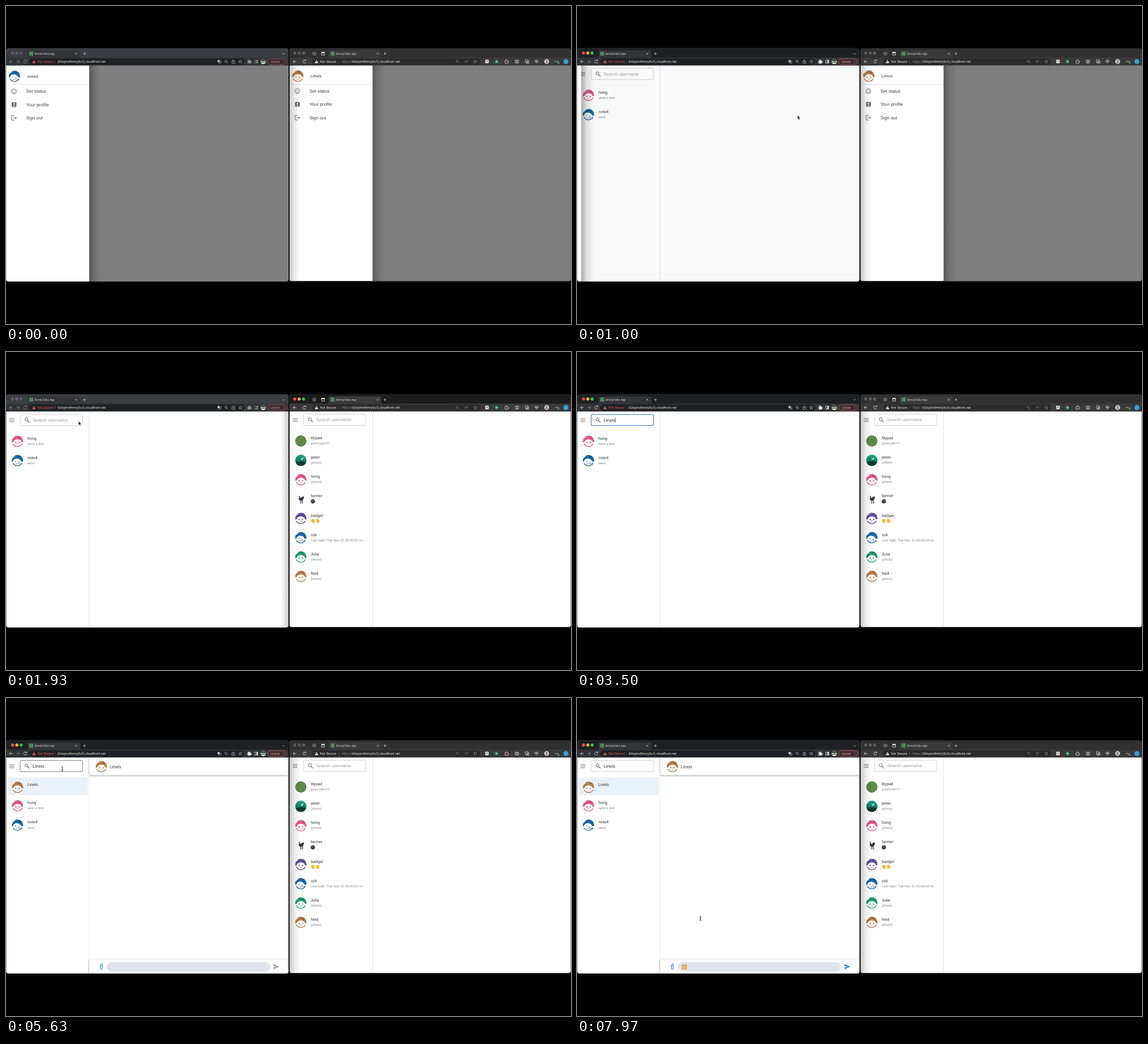
An HTML page for the animation above (8 s loop, 998 by 561 pixels).

```html
<!DOCTYPE html>
<html lang="en">
<head>
<meta charset="utf-8">
<title>Two chat windows</title>
<style>
html, body { margin: 0; width: 100%; height: 100%; overflow: hidden; background: #000; }
svg { display: block; width: 998px; height: 561px; font-family: "Liberation Sans", Arial, sans-serif; text-rendering: geometricPrecision; }
.light { fill: #5b5d61; }
.on .light0 { fill: #ef4d62; }
.on .light1 { fill: #f4b52e; }
.on .light2 { fill: #30c748; }
#left .strip { fill: #3a3d42; }
#left.on .strip { fill: #1f2023; }
#right .strip { fill: #303030; }
#right.on .strip { fill: #1c1c1c; }
.dim { opacity: .5; }
.on .dim { opacity: 1; }
.update { opacity: .75; }
.on .update { opacity: 1; }
</style>
</head>
<body>
<svg id="stage" viewBox="0 0 998 561"></svg>
<script>
const LOOP = 8000;
const PERSON = "Lewis";
const BLUE = "#1767ab", PINK = "#e5588c", BROWN = "#b77a45", PURPLE = "#6650a4", TEAL = "#219b72";
const URL_TEXT = "d1kqmv9mmy5u7j.cloudfront.net";

// Drawing helpers, each returning SVG markup
const text = (x, y, s, size, fill, more = "") => `<text x="${x}" y="${y}" font-size="${size}" fill="${fill}" ${more}>${s}</text>`;
const rect = (x, y, w, h, fill, more = "") => `<rect x="${x}" y="${y}" width="${w}" height="${h}" fill="${fill}" ${more}/>`;
const circle = (x, y, r, fill, more = "") => `<circle cx="${x}" cy="${y}" r="${r}" fill="${fill}" ${more}/>`;
const line = (d, stroke, w = .9, fill = "none") => `<path d="${d}" stroke="${stroke}" stroke-width="${w}" fill="${fill}"/>`;
const shape = (d, fill) => `<path d="${d}" fill="${fill}"/>`;
const at = (x, y, body, more = "") => `<g transform="translate(${x} ${y})" ${more}>${body}</g>`;
const group = (id, body, more = "") => `<g id="${id}" ${more}>${body}</g>`;

function avatar(x, y, c, wink) {
  const eyes = wink
    ? line("M-4.5 1.6l2.6 .3M1 2.6l2.4 .6M-2.6 5q2 1.4 3.6 .6", c, .8) + shape("M2 4l5 2.4-2.6 .8-.6 2.2z", "#fff") + line("M2 4l4.6 2.4-2.4 .6-.8 2z", "#444", .5)
    : circle(-3, 2, 1.2, c) + circle(3, 2, 1.2, c) + line("M-1.6 4.8q1.6 1.6 3.2 0", c, .8);
  return at(x, y, circle(0, 0, 10, c) +
    `<ellipse cx="0" cy="2.6" rx="7.4" ry="6" fill="#fff" ${wink ? 'transform="rotate(14)"' : ""}/>` +
    circle(-8, 3, 1.6, "#fff") + circle(8, 3, 1.6, "#fff") +
    shape("M-10 -6l4 -4 1.6 2.2-4.4 3.4z", "#fff") +
    line("M1 -9q.4 3 4 3.6M3.6 -8.6q0 2 2.6 3", "#0005", .8) + eyes);
}

const wave = (x, y) => at(x, y, line("M-3 -1l3 3M-2 -3l3 3.4M0 -3.6l2 3.4M3 -2.6l-.4 3", "#f2b632", 1.4) + circle(1, 1.2, 2.7, "#f4bd3c"));

const bird = (x, y) => at(x, y, line("M-4 -5q3 0 1.4 4M0 3v5M3 3v5", "#37323f", 1.3) +
  shape("M-4 -1q4 -1 9 -4 1 6-3 8-5 1-6-4z", "#37323f") + line("M-2 8h6", "#ddd", 1));

const hills = (x, y) => circle(x, y, 10, "url(#hills)") + shape(`M${x - 9} ${y + 3}q9 -3 18 0q-2 7-9 7t-9-7z`, "#0d3b31") +
  shape(`M${x - 1} ${y - 2}l6 -3-2 4z`, "#dff3e8");

function row(i, pic, name, sub) {
  const y = i * 34.1;
  return at(0, y, pic(20.3, 157.4) + text(37.8, 154.6, name, 7.15, "#333") + (sub && sub[0] === "<" ? sub : text(37.8, 163.7, sub, 5.93, "#858585")));
}
const face = (c, wink) => (x, y) => avatar(x, y, c, wink);

const hamburger = line("M6 117.6h8.6M6 120.3h8.6M6 123h8.6", "#6f6f6f", .9);
const magnifier = circle(36.2, 119, 2.7, "none", 'stroke="#666" stroke-width="1"') + line("M38.2 121l3.2 3.2", "#666", 1.2);

function drawer(id, name, pic) {
  const items = ["Set status", "Your profile", "Sign out"];
  const grey = "#666";
  const icons = circle(14, 150.6, 4.3, "none", `stroke="${grey}"`) + circle(12.5, 149.4, .7, grey) + circle(15.5, 149.4, .7, grey) +
    line("M11.8 151.8q2.2 2.6 4.4 0", grey, .8) +
    rect(10, 170, 8.4, 8.2, grey, 'rx="1"') + circle(14.2, 172.9, 1.4, "#fff") + shape("M11.3 177q2.9 -3 5.8 0z", "#fff") +
    line("M14.5 193.4h-4.4v8h4.4M12.6 197.4h5.6M16.2 195.3l2.2 2.1-2.2 2.1", grey, 1);
  return rect(0, 104, 499, 384, "#000", `id="${id}Dim"`) + group(id,
    rect(147, 104, 22, 384, "url(#shade)") + rect(-1, 104, 148, 384, "#fff") + pic(15, 124) +
    text(37.2, 126.5, name, 7.8, "#444") + rect(0, 138.4, 147, .7, "#ddd") + icons +
    items.map((s, i) => text(35.5, 153.3 + 23.5 * i, s, 8, "#444")).join(""));
}

const lights = (x, step) => [0, 1, 2].map(i => circle(x + step * i, 83, 2.7, "", `class="light light${i}"`)).join("").replace(/fill=""/g, "");
const cross = x => line(`M${x - 1.6} 82.6l3.2 3.2m0 -3.2l-3.2 3.2`, "#ccc", .7);
const plus = x => line(`M${x - 2.4} 84.2h4.8m-2.4 -2.4v4.8`, "#ccc", .8);
const back = (x, s = 1) => line(`M${x + 2.8 * s} 98h${-5.6 * s}m${2.4 * s} -2.4l${-2.4 * s} 2.4 ${2.4 * s} 2.4`, "#ddd", .9);
const reload = x => line(`M${x + 2} 96.2a2.7 2.7 0 1 0 .6 2.4M${x + 2.6} 94.6v2h-2`, "#ddd", .8);
const warn = (x, c) => shape(`M${x} 95l3.2 5.8h-6.4z`, c) + rect(x - .4, 97, .8, 2, "#222");
const star = (x, c) => line(`M${x} 95l.9 2 2.2 .2-1.7 1.4 .5 2.1-1.9 -1.1-1.9 1.1 .5 -2.1-1.7 -1.4 2.2 -.2z`, c, .6);
const lens = (x, c) => circle(x - .5, 97.4, 1.8, "none", `stroke="${c}" stroke-width=".7"`) + line(`M${x + .8} 98.8l1.8 1.8`, c, .8);
const puzzle = (x, c, fill) => line(`M${x - 2.4} 96.4h1.6a1 1 0 1 1 1.8 0h1.6v1.4a1 1 0 1 1 0 1.8v1.4h-5z`, c, .7, fill);
const tab = (x, w, c) => shape(`M${x - 3} 91.5q3 0 3 -3v-7.5q0 -3 3 -3h${w - 6}q3 0 3 3v7.5q0 3 3 3z`, c);
const title = x => text(x, 86.1, "BrimlyTalks App", 5.05, "#ddd");

function leftChrome() {
  const g = "#c8cacd", red = "#e2605c";
  return `<rect class="strip" x=".5" y="75" width="498" height="17"/>` + lights(11.5, 7.6) +
    tab(38, 93, "#333438") + rect(.5, 91, 498, 14, "#333438") +
    rect(41, 80.6, 7, 7, "#4f8a5b") + title(50.5) + cross(124) + plus(138.6) + line("M488.2 83.4l2 2 2 -2", "#ccc", .8) +
    `<g class="dim">${back(9)}</g><g opacity=".45">${back(21, -1)}</g><g class="dim">${reload(34)}</g>` +
    rect(41, 92.6, 380, 10.8, "#1f2023", 'rx="5.4"') + warn(49.5, red) + text(55.5, 100.1, "Not Secure", 5.8, red) +
    rect(87.3, 95.6, .6, 5, "#666") + text(91, 100.1, URL_TEXT, 5.88, "#eee") +
    rect(373.8, 95.2, 3.6, 4, g, 'rx=".6"') + line("M376.6 97h3v4h-3z", g, .6) + lens(389, g) +
    line("M400.4 97h-1.4v4h5v-4h-1.4M401.5 99v-4m-1.2 1.2l1.2 -1.2 1.2 1.2", g, .7) + star(414, g) +
    `<g class="dim">${puzzle(429.5, "#eee", "#eee")}${line("M439.6 95.6h5v5h-5z", "#eee", .8)}${rect(442.4, 95.6, 2.2, 5, "#eee")}</g>` +
    circle(454.4, 98, 4.5, "#dfe8d9") + shape("M450 97.2a4.5 4.5 0 0 1 8.8 0z", "#3b4a3c") + rect(451, 98.4, 6.8, 1.6, "#4b6350") +
    `<g class="update">${rect(462, 93, 33.4, 10.2, "#3a2a2d", 'rx="5.1" stroke="#d8736f" stroke-width=".7"')}${text(466.2, 100, "Update", 5.6, "#e79b95")}${[96, 98, 100].map(y => circle(490.6, y, .6, "#e79b95")).join("")}</g>`;
}

function rightChrome() {
  const g = "#aaa", w = "#eee";
  return `<rect class="strip" x="501" y="75" width="496.5" height="17"/>` + lights(510, 7.8) +
    tab(570, 93, "#3a3a3a") + rect(501, 91, 496.5, 14, "#3a3a3a") +
    line("M544.5 81l2.8 1.5v3l-2.8 1.5-2.8 -1.5v-3zM541.7 82.5l2.8 1.5 2.8 -1.5M544.5 84v3", g, .7) +
    line("M557.6 81.6h5v5h-5z", w, .8) + rect(557.4, 81.4, 5.4, 1.8, w) +
    rect(573.4, 80.4, 7, 7, "#4f8a5b") + title(583.3) + cross(656.6) + plus(669.5) +
    back(510) + reload(527) + rect(541, 92.4, 296, 10.8, "#2a2a2a", 'rx="4"') + warn(548.5, w) +
    text(554.5, 100, "Not Secure", 5.8, w) + rect(587.4, 95.6, .6, 5, "#777") +
    text(593, 100, `https://<tspan fill="#eee">${URL_TEXT}</tspan>`, 5.88, "#8d8d8d") +
    lens(797.5, "#888") + text(810.6, 100.2, "A", 6, "#888") + line("M815 95.4q1.4 1 .4 2.6", "#888", .6) + star(829, "#999") +
    rect(846.6, 94.8, 6, 6.2, w, 'rx="1"') + line("M849.6 96.2v3.4M848.4 97.2h2.4", "#333", .8) +
    circle(866.5, 98, 3, "#2c9a6a") + circle(866.5, 98, 1.2, "#9fd8bd") + puzzle(884, w, "none") +
    line("M899.6 95.8h5.8v4.6h-5.8zM902.5 95v6.2", w, .8) +
    line("M917.4 95h4.4v4.2h-4.4zM919 99.2v1.8h4.4v-4.4h-1.6", w, .7) + line("M920.6 97.4v2.4m-1.2 -1.2h2.4", w, .6) +
    line("M937 100.6l-2.8 -2.8q-.4 -2.4 1.6 -2.4l1.2 .8 1.2 -.8q2 0 1.6 2.4zM935 98h1.4l.8 -1.2.8 2 .6 -.8h1.6", w, .7) +
    circle(955, 98, 4.4, "#ccc") + circle(955, 96.8, 1.5, "#666") + shape("M952.2 100.8q2.8 -3.6 5.6 0z", "#666") +
    [970.6, 973, 975.4].map(x => circle(x, 98, .7, w)).join("") + circle(976, 100.2, 1.8, "#3f9e57") + circle(989, 98, 4.4, "#35a0dc");
}

// Emoji palette: one letter per glyph
const glyph = {
  f: () => circle(0, 0, 4.4, "#f5b83a") + circle(-1.5, -1, .6, "#5a3510") + circle(1.5, -1, .6, "#5a3510") + line("M-2 1.2q2 2 4 0", "#5a3510", .8),
  l: () => circle(0, 0, 4.4, "#f5b83a") + line("M-2.6 -1.2h1.8M.8 -1.2h1.8", "#5a3510", .7) + shape("M-2.6 .4h5.2q-.6 3-2.6 3t-2.6-3z", "#8a4a1e"),
  h: () => circle(0, 0, 4.4, "#f5b83a") + circle(-1.6, -1, 1.2, "#d8352c") + circle(1.6, -1, 1.2, "#d8352c") + line("M-2 1.4q2 2 4 0", "#5a3510", .8),
  c: () => circle(0, 0, 4.4, "#f5b83a") + rect(-3.8, -1.8, 7.6, 2, "#222", 'rx=".8"') + line("M-2 1.8q2 1.2 4 0", "#5a3510", .7),
  a: () => circle(0, .4, 4, "#f5b83a") + line("M-3 -3.6q3 -1.6 6 0", "#6cc4ee", 1) + line("M-2 1.4q2 2 4 0", "#5a3510", .7),
  k: () => rect(-4.3, -4.3, 8.6, 8.6, "#31b34a", 'rx="1"') + line("M-2.4 0l1.8 2 3 -4", "#fff", 1.2),
  p: () => shape("M-4 4l2.4 -7 4.6 4.6z", "#e1ad3c") + line("M0 -2l2 -2M2 0l2.4 -.6M1 -1l3 -3", "#d9506a", 1),
  s: () => circle(0, 1, 3.6, "#f0c49c") + shape("M-3.6 0q0 -4.4 3.6 -4.4t3.6 4.4z", "#cf3b35") + line("M-3.6 0h7.2M-2.2 3.4h4.4", "#fff", 1.4),
  w: () => wave(0, 0),
  t: () => shape("M0 -4.6l1.3 3 3.3 .3-2.5 2.1 .8 3.3-2.9 -1.7-2.9 1.7 .8 -3.3-2.5 -2.1 3.3 -.3z", "#f8cf4a"),
  u: () => shape("M-4 0h2l1.6 -4.4q2 0 1.2 3.4h3q1 4.6-1.4 5.2h-6.4z", "#f4bd3c"),
  o: () => circle(0, 0, 3, "#f6b02c") + circle(0, 0, 4, "none", 'stroke="#f6b02c" stroke-width="1.2" stroke-dasharray="1.2 1.9"'),
  i: () => shape("M0 -4.6q4 3.4 3.4 6.4-.8 2.8-3.4 2.8t-3.4 -2.8q0 -2 1.6 -3 1.6 -1.2 1.8 -3.4z", "#ee6a2c") + circle(0, 2.4, 1.6, "#fbd04c"),
  e: () => rect(-.8, -4, 1.6, 5.4, "#cf2d33", 'rx=".6"') + circle(0, 3.2, 1, "#cf2d33"),
  q: () => line("M-1.8 -2.2q0 -1.8 1.8 -1.8t1.8 1.8-1.8 2.4v1.2", "#cf2d33", 1.4) + circle(0, 3.4, .9, "#cf2d33"),
  d: () => circle(0, -.6, 3.9, "#eee") + rect(-2, 1.6, 4, 2.8, "#eee") + circle(-1.5, -.4, 1.1, "#444") + circle(1.5, -.4, 1.1, "#444"),
  g: () => line("M-2 -4q5 0 2 3.6t3 4.4h-5", "#4a9a3d", 2),
  b: () => `<ellipse rx="4.4" ry="3.5" fill="#eee"/>` + shape("M-3 2l-1 2.4 3 -1.4z", "#eee"),
  n: () => circle(0, 0, 4.3, "#3b3b40") + circle(-1, -1.4, .8, "#777"),
  r: () => circle(0, 0, 4.3, "#d0363f"),
  G: () => circle(0, 0, 4.4, "#45b653"),
  F: () => circle(0, .6, 4, "#63a945") + circle(-2, -2.6, 1.5, "#63a945") + circle(2, -2.6, 1.5, "#63a945") + line("M-2.6 1.4q2.6 1.6 5.2 0", "#2c5a22", .8),
  x: () => line("M-2 -3.6q2 .6 .6 5h3", "#eee", 1.5) + `<ellipse cx=".8" cy="2" rx="3" ry="1.8" fill="#eee"/>`,
  v: () => shape("M4 -4.2q-4 0-6 4l2.2 2.4q4 -2 3.800 -6.400z", "#d5dade") + line("M-2 0l-2 1M0 2.400l-1 2M-2.4 2.400l-1.400 1.400", "#d84a3e", 1.3),
  m: () => shape("M-1 -4.4a4.400 4.400 0 1 1-1.500 8.400q4.500 -3.500 1.500 -8.400z", "#f3c457"),
  j: () => rect(-4.200, 0, 8.400, 3.200, "#f2efe8", 'rx="1.400"') + rect(-4.400, -2.600, 8.800, 3.400, "#ec6a52", 'rx="1.500"')
};

function palette() {
  const rows = (list, y) => list.map((r, j) => [...r].map((k, i) => at(132.5 + 16.45 * i, y + 14 * j, glyph[k]())).join("")).join("");
  const c = "#ddd";
  const tabs = Array.from({ length: 9 }, (_, i) => at(131.6 + 12.1 * i, 457.6,
    i % 3 === 1 || i === 0 ? circle(0, 0, 2.9, "none", `stroke="${c}" stroke-width=".8"`) + line(i ? "M-1.4 .6q1.4 1.2 2.8 0" : "M0 -1.6v1.8h1.4", c, .7)
      : i === 8 ? line("M-2.2 3v-6h4.6l-1 1.8 1 1.600h-4.600", c, .8)
      : line(i % 2 ? "M-2.800 2.600v-3h2l2 -2v2h1.600v3z" : "M-2.600 -2.600h5.200v5.200h-5.200zM-1.200 0h2.400", c, .8))).join("");
  return shape("M179 465.500l5.500 5 5.500 -5z", "#6d6d6d") +
    rect(122.800, 325, 125, 140.800, "#6d6d6d", 'rx="4" stroke="#555" stroke-width=".6"') +
    line("M137 326v3.800q0 2 2 2h85.500q2 0 2 -2v-3.800", "#a47bb0", 1) + line("M128.500 327.500l3 2.500m1 -2v2", c, .7) +
    text(139, 330, "Search", 3.800, "#999") + rect(230.500, 326, 6.500, 3.600, "#999", 'rx=".6"') +
    rect(242.800, 326.600, 3.200, 7.600, "#c4c4c4", 'rx="1.600"') +
    text(128, 341.600, "FREQUENTLY USED", 4.800, "#eee") + rows(["kpswtuo", "ifl".replace("i", "f") .slice(0, 1) + "ifedag", "lfbnfrF", "xqlscfv", "Gmhj"].map((r, i) => i === 1 ? "fifedag" : r), 350.500) +
    text(128, 421.600, "SMILEYS &amp; PEOPLE", 4.800, "#eee") + rows(["lflllff", "llfffaf"], 430.300) +
    rect(123, 450.800, 124.600, .6, "#8d8d8d") + tabs + text(236.600, 459.600, "»", 6, c);
}

const searchBox = id => rect(25, 110.200, 110.200, 19.600, "#fff", `id="${id}" rx="2" stroke="#c8c8c8" stroke-width=".8"`) + magnifier;
const hint = id => text(47, 122.700, "Search username", 7.900, "#a0a0a0", `id="${id}"`);

const chat = rect(147, 104, 352, 384, "#fff") + rect(147, 136.500, 352, 4, "url(#under)") + rect(147, 135.800, 352, .8, "#bbb") +
  rect(145, 104, 2, 32, "url(#side)") + avatar(168.500, 121, BROWN) + text(183, 123.500, PERSON, 8, "#444") +
  rect(147, 460.600, 352, .7, "#ddd") + rect(144.500, 462, 2.500, 24, "url(#side)") +
  line("M166.800 471v5q0 2.600 1.800 2.600t1.800 -2.600v-5.600q0 -1.600-1.200 -1.600t-1.200 1.600v5", "#3f8de0", 1.100) +
  rect(178, 466, 289, 16.400, "#dfe2e9", 'rx="8.200"') +
  group("sent", rect(185, 470, 8.800, 9, "#cfa78f") + wave(189, 474.500)) +
  `<path id="send" d="M472.600 469.600l10 4.500-10 4.500v-3.500l6.600 -1-6.600 -1z"/>`;

const gradient = (id, stops, more = "") => `<linearGradient id="${id}" ${more}>${stops.map(([o, c, a]) => `<stop offset="${o}" stop-color="${c}" stop-opacity="${a}"/>`).join("")}</linearGradient>`;
const DOWN = 'x2="0" y2="1"';

document.getElementById("stage").innerHTML = `<defs>
  ${gradient("shade", [[0, "#000", .32], [.4, "#000", .12], [1, "#000", 0]])}
  ${gradient("side", [[0, "#000", 0], [1, "#000", .2]])}
  ${gradient("under", [[0, "#000", .16], [1, "#000", 0]], DOWN)}
  ${gradient("hills", [[0, "#1fa884", 1], [.6, "#187a62", 1], [1, "#0c3a30", 1]], DOWN)}
  <clipPath id="frameL"><rect x=".5" y="75" width="498.300" height="411" rx="4"/></clipPath>
  <clipPath id="frameR"><rect x="501" y="75" width="496.500" height="410" rx="4"/></clipPath>
  </defs>` +
  rect(500.400, 74.600, 497.400, 411.600, "#3a3a3a", 'rx="4"') +
  group("right", rect(501, 105, 497, 381, "#fff") + at(500.500, -.4,
    rect(146.500, 105, .7, 381, "#ddd") + hamburger + searchBox("boxR") + hint("hintR") +
    row(0, (x, y) => circle(x, y, 10, "#5c8a48"), "lilypad", "good job!!!!!!") +
    row(1, hills, "peter", "(photo)") + row(2, face(PINK), "hong", "(photo)") +
    row(3, bird, "farmer", circle(41.500, 161.600, 3.800, "#444") + circle(40.500, 160.300, .8, "#888")) +
    row(4, face(PURPLE), "badger", wave(41, 161.700) + wave(49.400, 161.700)) +
    row(5, face(BLUE, true), "ozk", "Last login: Tue Nov 21 00:40:00 on…") +
    row(6, face(TEAL), "Julia", "(photo)") + row(7, face(BROWN), "Ned", "(photo)") +
    drawer("drawR", PERSON, face(BROWN))) + rightChrome() +
    rect(501, 105, 20, 381, "url(#shade)", 'id="castR" opacity=".7"'), 'clip-path="url(#frameR)"') +
  rect(.3, 74.600, 498.600, 411.600, "#4a4c50", 'rx="4"') +
  group("left", rect(0, 105, 499, 382, "#fff") + rect(146.500, 105, .7, 381, "#ddd") + hamburger + searchBox("boxL") + hint("hintL") +
    text(47, 122.800, "", 8, "#333", 'id="typed"') + rect(67, 115.600, .7, 9, "#222", 'id="caret"') +
    group("found", rect(3, 140.200, 141.500, 31, "#e9f1f9") + row(0, face(BROWN), PERSON, "")) +
    group("rows", row(0, face(PINK), "hong", "send a text") + row(1, face(BLUE, true), "note4", "send")) +
    group("chat", chat) + drawer("drawL", "note4", face(BLUE, true)) + leftChrome() +
    rect(485, 105, 14, 381, "url(#side)", 'id="castL"'), 'clip-path="url(#frameL)"') +
  group("picker", palette()) +
  group("cursor", `<path id="arrow" d="M0 0v7l1.600 -1.400 1.200 2.600 1.200 -.6-1.100 -2.500h2.200z" fill="#000" stroke="#fff" stroke-width=".6"/>` +
    `<path id="beam" d="M-1.800 -3.600q1.800 0 1.800 1v5.200q0 1-1.800 1M1.800 -3.600q-1.800 0-1.800 1v5.200q0 1 1.800 1M-1 .8h2" fill="none" stroke="#333" stroke-width=".8"/>`);

const $ = id => document.getElementById(id);
const show = (id, on) => $(id).setAttribute("visibility", on ? "visible" : "hidden");
const clamp = v => Math.min(1, Math.max(0, v));
const smooth = v => v * v * (3 - 2 * v);
const between = (t, a, b) => t >= a && t < b;

// Pointer stops: time, x, y
const stops = [[400, 210, 420], [770, 389.500, 193], [1030, 389.500, 193], [1420, 760, 260], [1560, 760, 260], [1730, 560, 220],
  [1920, 128, 122], [1960, 128, 122], [2080, 99.500, 125], [5640, 99.500, 125], [5960, 200, 474], [6300, 200, 474], [6650, 246.500, 457],
  [6760, 246.500, 457], [7250, 183, 349], [7500, 183, 349], [7800, 218, 389]];

function pointer(t) {
  const i = stops.findIndex(s => s[0] > t);
  if (i < 0) return stops[stops.length - 1].slice(1);
  if (!i) return stops[0].slice(1);
  const [a, x, y] = stops[i - 1], [b, u, v] = stops[i], k = smooth((t - a) / (b - a));
  return [x + (u - x) * k, y + (v - y) * k];
}

function slide(id, t, start) {
  const k = smooth(clamp((t - start) / 97));
  $(id).setAttribute("transform", `translate(${-147 * k})`);
  $(id + "Dim").setAttribute("opacity", .5 * (1 - k));
  show(id, k < 1);
}

function draw() {
  const t = performance.now() % LOOP;
  const rightOn = between(t, 1440, 2100), open = t >= 5070, focus = between(t, 2160, 5070);

  $("left").classList.toggle("on", t >= 400 && !rightOn);
  $("right").classList.toggle("on", rightOn);
  show("castR", !rightOn);
  show("castL", rightOn);
  slide("drawL", t, 917);
  slide("drawR", t, 1460);

  const letters = t < 2770 ? 0 : Math.min(PERSON.length, 1 + Math.floor((t - 2770) / 62));
  $("typed").textContent = PERSON.slice(0, letters);
  show("hintL", !letters);
  $("caret").setAttribute("x", 47 + $("typed").getComputedTextLength());
  show("caret", focus && (t < 3000 || (t - 3000) % 500 < 265));
  const hover = between(t, 5430, 5690);
  $("boxL").setAttribute("stroke", focus ? "#2f75b5" : hover ? "#555" : "#c8c8c8");
  $("boxL").setAttribute("stroke-width", focus ? 1.100 : .8);

  show("found", open);
  show("chat", open);
  $("rows").setAttribute("transform", `translate(0 ${open ? 32.800 : 0})`);
  $("picker").setAttribute("opacity", clamp((t - 6220) / 100) * clamp((7640 - t) / 100));
  const sent = t >= 7900;
  show("sent", open && sent);
  $("send").setAttribute("fill", sent ? "#1f86e0" : "#9c9c9c");

  const visible = between(t, 400, 2700) || t >= 5430;
  const beam = between(t, 2100, 2700) || between(t, 5430, 6300) || t >= 7600;
  $("cursor").setAttribute("transform", `translate(${pointer(t)})`);
  show("arrow", visible && !beam);
  show("beam", visible && beam);
  requestAnimationFrame(draw);
}
draw();
</script>
</body>
</html>
```
